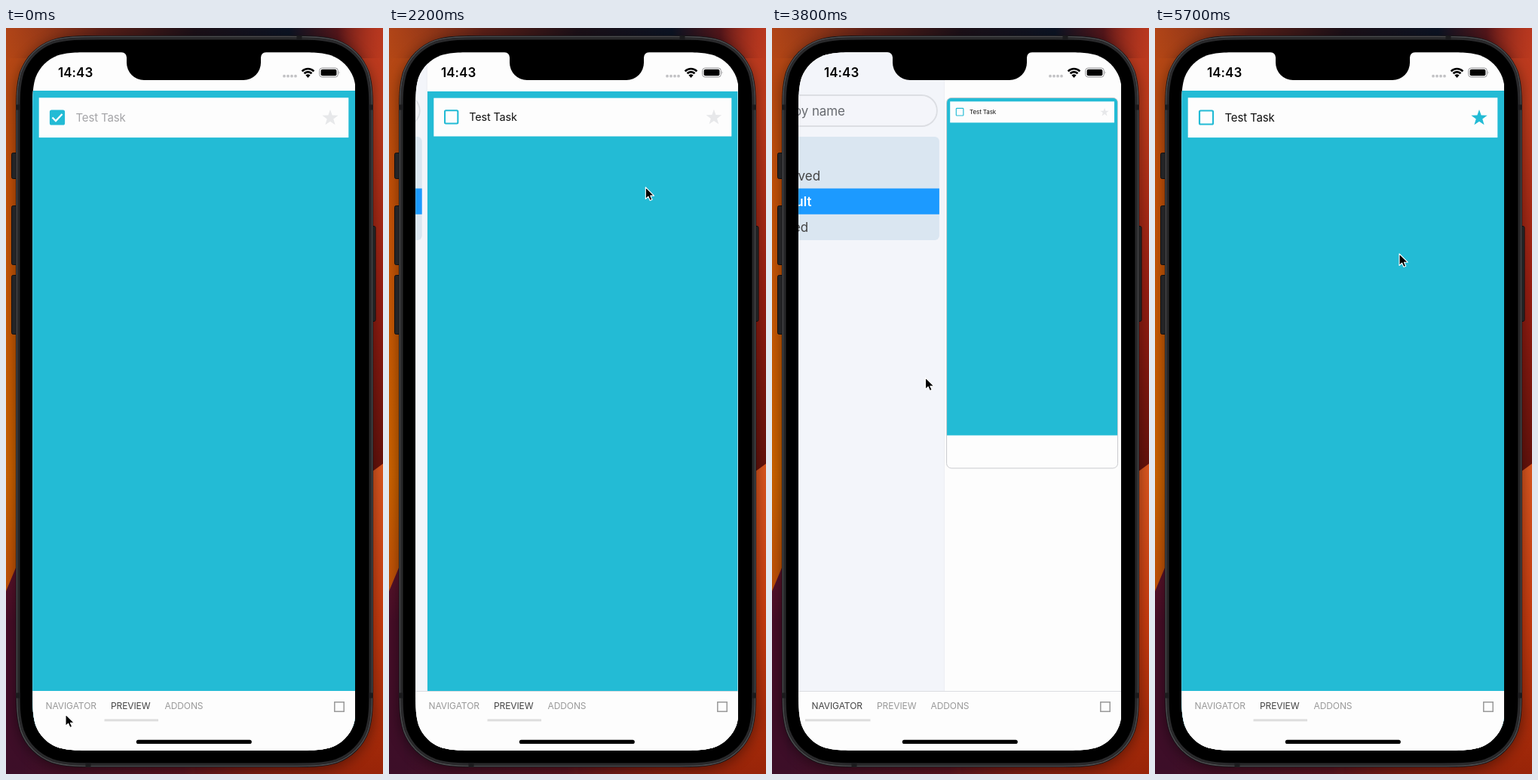
Animation, 500 px wide and 988 px high, one loop 5.8 s. Source, as an HTML page:

```html
<!DOCTYPE html>
<html lang="en">
<head>
<meta charset="utf-8">
<title>Task stories on a phone</title>
<style>
  html, body { margin: 0; width: 100%; height: 100%; overflow: hidden; background: #7a1c0c; }
  svg { display: block; width: 500px; height: 988px; font-family: Inter, "Open Sans", sans-serif; }
  .tab { font-size: 12px; letter-spacing: -.1px; fill: #999; }
  .tab.on { fill: #444; }
  .row { font-size: 17px; fill: #444; }
  .on .row { fill: #fff; font-weight: 600; }
  .mark { fill: none; stroke: #1ea0ff; stroke-width: 1.5; stroke-linejoin: round; }
  .on .mark { stroke: #fff; }
</style>
</head>
<body>
<svg viewBox="0 0 500 988">
  <defs>
    <linearGradient id="topGlow">
      <stop offset="0" stop-color="#7a2c18" stop-opacity="0"/><stop offset=".25" stop-color="#5c2018"/>
      <stop offset=".5" stop-color="#1c1018"/><stop offset=".75" stop-color="#0c1424"/>
      <stop offset=".88" stop-color="#54161a"/><stop offset="1" stop-color="#9c2a18" stop-opacity="0"/>
    </linearGradient>
    <linearGradient id="leftGlow" x2="0" y2="1">
      <stop offset="0" stop-color="#b04418"/><stop offset=".2" stop-color="#c45008"/>
      <stop offset=".6" stop-color="#cc6200"/><stop offset=".76" stop-color="#c05008"/>
    </linearGradient>
    <linearGradient id="rightGlow" x2="0" y2="1">
      <stop offset="0" stop-color="#b83820"/><stop offset=".1" stop-color="#c03c1c"/>
      <stop offset=".35" stop-color="#981e12"/><stop offset=".6" stop-color="#64120c"/>
    </linearGradient>
    <linearGradient id="fold" x2="0" y2="1">
      <stop offset="0" stop-color="#dc5820"/><stop offset=".5" stop-color="#c83c10"/>
      <stop offset="1" stop-color="#982408"/>
    </linearGradient>
    <linearGradient id="plum" x2="0" y2="1">
      <stop offset="0" stop-color="#6c182c"/><stop offset=".4" stop-color="#480e28"/>
      <stop offset="1" stop-color="#3c0e28"/>
    </linearGradient>
    <linearGradient id="floor">
      <stop offset="0" stop-color="#3c0e28"/><stop offset=".45" stop-color="#5c1420"/>
      <stop offset="1" stop-color="#982408" stop-opacity="0"/>
    </linearGradient>
    <filter id="blur" x="-10%" y="-10%" width="120%" height="120%"><feGaussianBlur stdDeviation="9"/></filter>
    <clipPath id="screen"><path id="screenShape"/></clipPath>
    <clipPath id="sheet"><rect id="sheetShape" width="428" height="925"/></clipPath>
  </defs>

  <!-- wallpaper -->
  <rect width="250" height="988" fill="url(#leftGlow)"/>
  <rect x="250" width="250" height="988" fill="url(#rightGlow)"/>
  <rect width="500" height="40" fill="url(#topGlow)"/>
  <path d="M250 760L500 577V988H250Z" fill="url(#fold)"/>
  <path d="M0 746L40 650V988H0Z" fill="url(#plum)"/>
  <rect y="900" x="20" width="480" height="88" fill="url(#floor)"/>
  <rect x="13" y="14" width="474" height="968" rx="76" opacity=".45" filter="url(#blur)"/>

  <!-- phone body -->
  <g fill="#242426" stroke="#101012">
    <rect x="7.500" y="165.500" width="9" height="34" rx="2"/>
    <rect x="7.500" y="235.500" width="9" height="78" rx="2"/>
    <rect x="7.500" y="327.500" width="9" height="78" rx="2"/>
    <rect x="481.500" y="262.500" width="8.500" height="126" rx="2"/>
  </g>
  <path id="shell" fill="#141416"/>
  <path id="rim" fill="none" stroke="#4c4c4f" stroke-width="1.500"/>
  <path id="bezel" fill="#000" stroke="#29292b" stroke-width="3"/>
  <path d="M14 105h5M481 105h5M14 884h5M481 884h5M389 11v5M109 973v5" stroke="#1b1b1d" stroke-width="7"/>

  <g clip-path="url(#screen)">
    <rect x="35" y="32" width="428" height="925" fill="#fdfdfd"/>

    <g id="panel">
      <rect x="35" y="32" width="289" height="847" fill="#f3f5fa"/>
      <path d="M323.500 32V878" stroke="#eceef3"/>
      <rect x="44.500" y="89" width="269.500" height="41" rx="20.500" fill="#f4f5fa" stroke="#dcdee3" stroke-width="1.800"/>
      <g fill="none" stroke="#666a70" stroke-width="1.600" stroke-linecap="round">
        <circle cx="66.200" cy="108" r="7.300"/><path d="M71.500 113.300L76 117.800"/>
      </g>
      <text x="85" y="115.500" font-size="17" letter-spacing="-.1" fill="#686b70">Find by name</text>
      <rect x="41.500" y="144" width="275.500" height="137" rx="6" fill="#dae6f1"/>
      <g class="mark"><rect x="50.700" y="155.700" width="10.600" height="10.600" rx="2"/><path d="M56 155.700v10.600M50.700 161h10.600"/></g>
      <text x="68" y="167" font-size="17" font-weight="600" letter-spacing="-.1" fill="#111">Task</text>
      <g id="rows"></g>
    </g>

    <g id="preview">
      <g clip-path="url(#sheet)">
        <rect width="428" height="925" fill="#fdfdfd"/>
        <rect id="canvas" width="428" height="843"/>
        <rect x="8.700" y="9.300" width="410.600" height="52.800" fill="#fdfdfd"/>
        <rect id="box" x="24" y="26.500" width="18" height="18" rx="1.500" stroke-width="2.200"/>
        <path id="tick" d="M26.500 35.500L31 40L39.500 31" fill="none" stroke="#fff" stroke-width="2.300"/>
        <text id="label" x="57.500" y="41" font-size="15" letter-spacing="-.15">Test Task</text>
        <path id="star"/>
      </g>
      <rect id="edge" width="428" height="925" rx="12" fill="none" stroke="#c9cace" vector-effect="non-scaling-stroke"/>
    </g>

    <rect x="35" y="878" width="428" height="80" fill="#fdfdfd"/>
    <path id="rule" d="M35 878.500H463" stroke="#dcdde1"/>
    <text class="tab" x="52.500" y="902">NAVIGATOR</text>
    <text class="tab" x="139" y="902">PREVIEW</text>
    <text class="tab" x="210.500" y="902">ADDONS</text>
    <rect id="underline" y="915.300" height="3" fill="#dedede"/>
    <rect x="435.800" y="892.800" width="12.400" height="12.400" fill="none" stroke="#999" stroke-width="1.500"/>
    <rect x="172.800" y="942.700" width="153" height="5.400" rx="2.700"/>
  </g>

  <!-- notch and status bar -->
  <path d="M153 31H345V32A7 7 0 0 0 338 39V46A23 23 0 0 1 315 69H183A23 23 0 0 1 160 46V39A7 7 0 0 0 153 32Z"/>
  <text x="69" y="65.300" font-size="17" font-weight="600" letter-spacing=".05">14:43</text>
  <path d="M369 63.700h17" stroke="#c2c2c5" stroke-width="3.800" stroke-linecap="round" stroke-dasharray="0 5"/>
  <path id="wifi" fill="none" stroke="#000" stroke-width="2.700"/>
  <path d="M400.500 66L397.400 62.600A4.500 4.500 0 0 1 403.600 62.600Z"/>
  <rect x="415.700" y="53" width="24.600" height="12" rx="3.600" fill="none" stroke="#949497"/>
  <rect x="417.600" y="54.800" width="20.800" height="8.400" rx="2"/>
  <path d="M441.600 57q1.800 2 0 4z" fill="#949497"/>

  <path id="cursor" d="M0 0V15.500L3.600 12.200L5.900 17.500L8.700 16.300L6.400 11.200H11.200Z" stroke="#fff" stroke-width="1.100" stroke-linejoin="round"/>
</svg>

<script>
const LOOP = 5800, STEP = 100, SLIDE = 400, TEAL = '#23bbd5';
const $ = id => document.getElementById(id);
const set = (el, attrs) => { for (const k in attrs) el.setAttribute(k, attrs[k]); };

// time, x, y of the pointer tip
const path = [
  [0, 79, 909], [250, 79, 907], [800, 75.5, 247], [1000, 96, 228], [1300, 98, 228],
  [1700, 343, 194], [2150, 346, 196], [2600, 180, 631], [3050, 84, 898],
  [3550, 84, 896], [3800, 203.5, 463], [4200, 108, 264], [4550, 106, 262],
  [4950, 349, 240], [5350, 349, 240], [5700, 324, 299], [5800, 324, 299]
];
// time, tab that opens: 0 navigator, 1 preview
const taps = [[-500, 1], [150, 0], [1850, 1], [3554, 0], [5114, 1]];
// time, selected story
const picks = [[0, 0], [1100, 1], [4450, 2]];

const last = (list, t) => list.filter(e => e[0] <= t).pop();

function easeInOut(x) {
  if (x >= 1) return 1;
  const half = u => Math.pow(u * 2, 1.6) / 2;
  return x < .5 ? half(x) : 1 - half(1 - x);
}

function pointer(t) {
  const i = path.findIndex(p => p[0] > t);
  const a = path[i - 1], b = path[i];
  const u = (t - a[0]) / (b[0] - a[0]);
  const k = u * u * (3 - 2 * u);
  return [a[1] + (b[1] - a[1]) * k, a[2] + (b[2] - a[2]) * k];
}

// Rectangle whose corners ease into the sides, inset from the shell's bounds.
function squircle(inset, r) {
  const [left, top, right, bottom] = [13 + inset, 10 + inset, 487 - inset, 979 - inset];
  // distances along the two sides of a corner, in radii
  const curve = [[0, 1.529], [0, 1.088], [0, .868], [.075, .631], [.169, .373],
    [.373, .169], [.631, .075], [.868, 0], [1.088, 0], [1.529, 0]];
  const corner = (x, y, sx, sy, flip) => {
    const pts = curve.map(([u, v]) => [x + sx * u * r, y + sy * v * r].join(' '));
    if (flip) pts.reverse();
    return pts[0] + 'C' + pts.slice(1).join(' ');
  };
  return 'M' + [
    corner(left, top, 1, 1), corner(right, top, -1, 1, true),
    corner(right, bottom, -1, -1), corner(left, bottom, 1, -1, true)
  ].join('L') + 'Z';
}

set($('shell'), { d: squircle(0, 75) });
set($('rim'), { d: squircle(1.5, 73.5) });
set($('bezel'), { d: squircle(4, 71) });
set($('screenShape'), { d: squircle(22.2, 53.3) });

$('rows').innerHTML = ['Archived', 'Default', 'Pinned'].map((name, i) => {
  const y = 178.2 + i * 34.3;
  const band = i < 2
    ? `M41.5 ${y}h275.5v34.3h-275.5z`
    : `M41.5 ${y}h275.5v28.3q0 6 -6 6h-263.5q-6 0 -6 -6z`;
  return `<g><path d="${band}" fill="#1c9aff"/>
    <path class="mark" d="M70.700 ${y + 11.800}h7.800v11.200l-3.900 -3.500l-3.900 3.500z"/>
    <text class="row" x="88" y="${y + 23.300}">${name}</text></g>`;
}).join('');

const starPoints = Array.from({ length: 10 }, (_, i) => {
  const r = i % 2 ? 4.5 : 11.2, a = i * Math.PI / 5;
  return [395 + r * Math.sin(a), 36.2 - r * Math.cos(a)].map(v => v.toFixed(2));
});
set($('star'), { d: 'M' + starPoints.join('L') + 'Z' });
set($('canvas'), { fill: TEAL });
set($('box'), { stroke: TEAL });

set($('wifi'), {
  d: [6.9, 10.9].map(r => {
    const s = r * .72;
    return `M${400.5 - s} ${65.2 - s}A${r} ${r} 0 0 1 ${400.5 + s} ${65.2 - s}`;
  }).join('')
});

const tabs = document.querySelectorAll('.tab');
const rows = [...$('rows').children];

function draw(t) {
  const [tapTime, tab] = last(taps, t);
  const story = last(picks, t)[1];
  const moved = easeInOut((t - tapTime) / SLIDE);
  const open = tab ? 1 - moved : moved;
  const nav = tab === 0;

  set($('panel'), { transform: `translate(${(open - 1) * 289} 0)` });
  set($('preview'), {
    transform: `translate(${35 + open * 293} ${83 + open * 14}) scale(${1 - open * .7})`
  });
  set($('sheetShape'), { rx: nav ? 12 : 0 });
  set($('edge'), { visibility: nav ? 'visible' : 'hidden' });
  set($('rule'), { visibility: open > 0 ? 'visible' : 'hidden' });

  rows.forEach((row, i) => {
    set(row, { class: i === story ? 'on' : '' });
    set(row.firstElementChild, { visibility: i === story ? 'visible' : 'hidden' });
  });
  set($('box'), { fill: story ? '#fdfdfd' : TEAL });
  set($('tick'), { visibility: story ? 'hidden' : 'visible' });
  set($('label'), { fill: story ? '#111' : '#a5a5a8' });
  set($('star'), { fill: story === 2 ? TEAL : '#e7e8ea' });

  tabs.forEach((el, i) => el.classList.toggle('on', i === tab));
  set($('underline'), nav ? { x: 44, width: 86.5 } : { x: 130.5, width: 71.5 });
  set($('cursor'), { transform: `translate(${pointer(t)})` });
}

const start = performance.now();
function tick() {
  const t = (performance.now() - start) % LOOP;
  draw(Math.floor(t / STEP) * STEP);
  requestAnimationFrame(tick);
}
tick();
</script>
</body>
</html>
```
